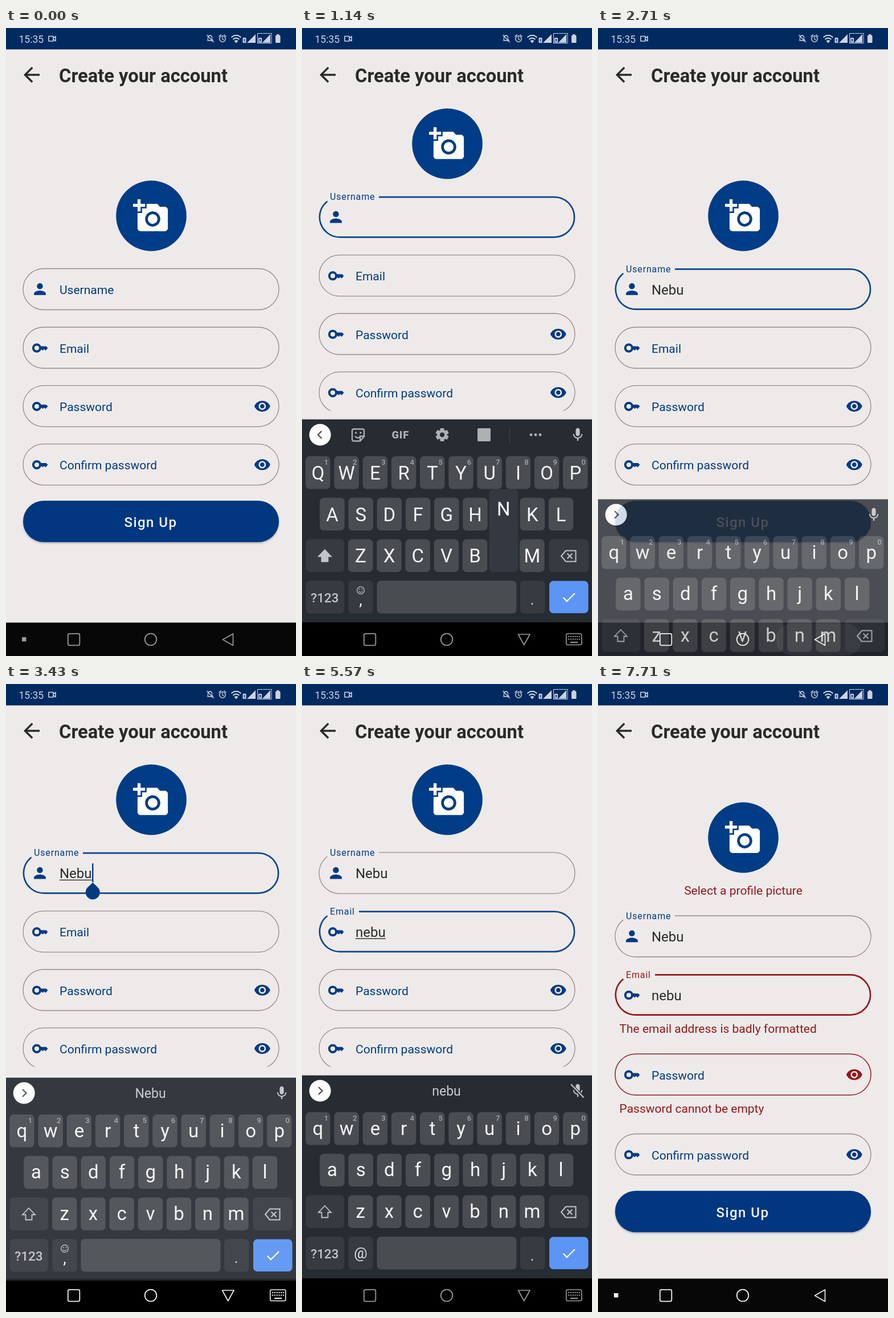
These frames come from a looping animation (509 px wide and 1100 px high, 8000 ms). An HTML page:

```html
<!DOCTYPE html>
<html lang="en">
<head>
<meta charset="utf-8">
<title>Create your account</title>
<style>
  html, body { margin: 0; width: 100%; height: 100%; overflow: hidden; background: #eeeaea; }
  svg { display: block; width: 100vw; height: 100vh; font-family: Roboto, sans-serif; }
</style>
</head>
<body>
<svg id="stage" viewBox="0 0 509 1100" preserveAspectRatio="none"></svg>
<script>
const stage = document.getElementById('stage');
const LOOP = 8000, FPS = 7;
const BLUE = '#003b82', RED = '#97161b', INK = '#2a2a2c', GREY = '#c3c5c8';
const NAME = 'Nebu';

const PATHS = {
  back: 'M20 11H7.83l5.59-5.59L12 4l-8 8 8 8 1.41-1.41L7.83 13H20z',
  camera: 'M3 4V1h2v3h3v2H5v3H3V6H0V4zm3 6V7h3V4h7l1.83 2H21c1.1 0 2 .9 2 2v12c0 1.1-.9 2-2 2H5c-1.1 0-2-.9-2-2V10zm7 9c2.76 0 5-2.24 5-5s-2.24-5-5-5-5 2.24-5 5 2.24 5 5 5zm-3.2-5c0 1.77 1.43 3.2 3.2 3.2s3.2-1.43 3.2-3.2-1.43-3.2-3.2-3.2-3.2 1.43-3.2 3.2z',
  person: 'M12 12c2.21 0 4-1.79 4-4s-1.79-4-4-4-4 1.79-4 4 1.79 4 4 4zm0 2c-2.67 0-8 1.34-8 4v2h16v-2c0-2.66-5.33-4-8-4z',
  eye: 'M12 4.5C7 4.5 2.73 7.61 1 12c1.73 4.39 6 7.5 11 7.5s9.27-3.11 11-7.5c-1.73-4.39-6-7.5-11-7.5zM12 17c-2.76 0-5-2.24-5-5s2.24-5 5-5 5 2.24 5 5-2.24 5-5 5zm0-8c-1.66 0-3 1.34-3 3s1.34 3 3 3 3-1.34 3-3-1.34-3-3-3z',
  mic: 'M12 14c1.66 0 3-1.34 3-3V5c0-1.66-1.34-3-3-3S9 3.34 9 5v6c0 1.66 1.34 3 3 3zm5.3-3c0 3-2.54 5.1-5.3 5.1S6.7 14 6.7 11H5c0 3.41 2.72 6.23 6 6.72V21h2v-3.28c3.28-.49 6-3.31 6-6.72z'
};

// Drawing helpers
const text = (x, y, size, fill, str, more = '') =>
  `<text x="${x}" y="${y}" font-size="${size}" fill="${fill}" ${more}>${str}</text>`;
const mid = (x, y, size, fill, str, more = '') => text(x, y, size, fill, str, 'text-anchor="middle" ' + more);
const rect = (x, y, w, h, fill, r = 0, more = '') =>
  `<rect x="${x}" y="${y}" width="${w}" height="${h}" rx="${r}" fill="${fill}" ${more}/>`;
const disc = (x, y, r, fill) => `<circle cx="${x}" cy="${y}" r="${r}" fill="${fill}"/>`;
const ring = (x, y, r, color, w) =>
  `<circle cx="${x}" cy="${y}" r="${r}" fill="none" stroke="${color}" stroke-width="${w}"/>`;
const line = (d, color, w, more = '') =>
  `<path d="${d}" fill="none" stroke="${color}" stroke-width="${w}" ${more}/>`;
const shape = (d, fill) => `<path d="${d}" fill="${fill}"/>`;
const icon = (name, x, y, s, fill) =>
  `<path transform="translate(${x - 12 * s} ${y - 12 * s}) scale(${s})" d="${PATHS[name]}" fill="${fill}" fill-rule="evenodd"/>`;
const group = (y, body, more = '') => `<g transform="translate(0 ${y})" ${more}>${body}</g>`;

const pen = document.createElement('canvas').getContext('2d');
const widthOf = str => { pen.font = '24px Roboto, sans-serif'; return pen.measureText(str).width; };

// Timeline, counted in steps of 1/7 s
const within = (k, ...spans) => spans.some(([a, b]) => k >= a && k <= b);
const typed = (k, word, times) => word.slice(0, times.filter(t => k >= t).length);
const SLIDE = {
  3: [60, .87], 4: [4, .93], 18: [40, .92], 19: [140, .82], 20: [300, .4],
  23: [60, .87], 24: [4, .93], 45: [40, .92], 46: [140, .82], 47: [300, .4]
};
const PRESS = { 8: 'N', 10: 'e', 12: 'b', 13: 'u', 32: 'n', 34: 'e', 36: 'b', 37: 'u' };

function stateAt(k) {
  const [offset, alpha] = SLIDE[k] || [0, 1];
  return {
    k, offset, alpha,
    email: k >= 27,
    user: typed(k, NAME, [9, 11, 13, 14]),
    mail: typed(k, NAME.toLowerCase(), [33, 35, 37, 38]),
    open: within(k, [3, 20], [23, 47]),
    closing: within(k, [18, 20], [45, 47]),
    lifted: within(k, [4, 17], [24, 44]),
    caret: within(k, [2, 5], [9, 13], [21, 31], [33, 38], [40, 41], [48, 51]),
    composing: within(k, [9, 17], [23, 26], [33, 44]),
    bright: within(k, [17, 33], [40, 56]),
    caps: k < 9,
    mailKeys: k >= 28,
    errors: k >= 52,
    press: PRESS[k],
    userFloat: Math.min(1, k / 2),
    mailFloat: Math.max(0, Math.min(1, (k - 26) / 2))
  };
}

function statusBar() {
  const c = '#cbd3e0';
  return rect(0, 0, 509, 37.5, '#002a60') +
    text(22.5, 25.5, 17.5, c, '15:35') +
    line('M75 14.5h8v8.5h-8zM83 17.5l4-2.5v7.5l-4-2.5', c, 1.6) +
    line('M354 22h9l-1.5-3v-3q-1-3-3.5-3t-3.5 3v3zM352.5 12l12 13', c, 1.3) +
    ring(380, 19, 5.2, c, 1.5) + line('M380 15.5v4l2.5 1.5M373.5 15l4-3.5M382.5 11.5l4 3.5', c, 1.4) +
    line('M395.5 16.5q8.5-7.5 17 0M398.5 20q5.5-4.8 11 0', c, 2) + shape('M400.5 22.5q3.5-2.5 7 0l-3.5 4z', c) +
    shape('M438 11v15h-15z', c) + rect(415.5, 17, 6, 9, c, 1) + rect(417.8, 19, 1.4, 5, '#002a60') +
    rect(441.5, 9.5, 24.5, 17, 'none', 0, `stroke="${c}" stroke-width="1"`) +
    shape('M464 11v14.5h-14z', c) + rect(443, 17, 6, 8.5, c, 1) + rect(445, 19, 2, 4.5, '#002a60') +
    rect(473, 13, 8.5, 13, c, 1) + rect(475, 11, 4.5, 2, c);
}

const keyGlyph = y => ring(54, y, 6.1, BLUE, 4) +
  shape(`M61 ${y - 3}h9.5l3 3-4 4.5-2.5-2.5-2.5 2.5-2-2H61z`, BLUE);

// One outlined field; "float" runs from placeholder (0) to raised label (1)
function field(y, label, o = {}) {
  const { float = 0, focus, error, value = '', underline, caret, eye, gap } = o;
  const color = error ? RED : focus ? '#0d478c' : '#918d8e';
  const stroke = focus ? 2.7 : error ? 1.5 : 1.3;
  // A thick stroke grows inwards
  const a = focus ? .9 : 0, b = 72 - a, r = 36 - a;
  const outline = `M${float === 1 ? gap : 66} ${a}H443A${r} ${r} 0 0 1 443 ${b}H66A${r} ${r} 0 0 1 ` +
    (float === 1 ? `44.5 ${36 - Math.sqrt(r * r - 21.5 ** 2)}` : `66 ${a}`);
  const end = 94 + widthOf(value);
  const mix = (from, to) => from + (to - from) * float;
  return group(y,
    line(outline, color, stroke) +
    (label === 'Username' ? icon('person', 59.5, 35.9, 1.3, BLUE) : keyGlyph(36.5)) +
    text(mix(94, 49), mix(44.5, 6), mix(21, 16), error && focus ? RED : BLUE, label, `letter-spacing="${.85 * float}"`) +
    (value && text(94, 45, 24, INK, value)) +
    (underline && value ? rect(94, 47.5, end - 94, 1.4, INK) : '') +
    (caret ? rect(end + .5, 19, 2.4, 33, BLUE) : '') +
    (eye ? icon('eye', 449.8, 36.3, 1.27, error ? RED : BLUE) : ''));
}

function form(s) {
  const e = s.errors;
  const onUser = s.k >= 1 && !s.email;
  const handleX = 94 + widthOf(s.user) + 1.7;
  const handle = within(s.k, [23, 26])
    ? shape(`M${handleX} 474l9 8.5a12.5 12.5 0 1 1-18 0z`, BLUE) : '';
  const glow = { 50: .06, 51: .12, 52: .1, 53: .05 }[s.k] || 0;
  const button = rect(30, 830.5, 449, 72, '#000', 36, 'opacity=".25" filter="url(#soft)"') +
    rect(30, 828, 449, 72.5, '#003780', 36) +
    rect(30, 828, 449, 72.5, '#fff', 36, `opacity="${glow}"`) +
    text(207.5, 874, 24, '#f4f4f6', 'Sign Up', 'font-weight="500" letter-spacing="1.45"');
  const body =
    group(e ? -60 : 0, disc(255, 329, 61.8, '#003d86') + icon('camera', 254.8, 329.3, 2.66, '#fff')) +
    field(e ? 406 : 421.5, 'Username', {
      float: s.userFloat, focus: onUser, value: s.user, gap: 135,
      underline: s.composing && onUser, caret: s.caret && onUser
    }) +
    field(e ? 508.5 : 524, 'Email', {
      float: s.mailFloat, focus: s.email, error: e, value: s.mail, gap: 100,
      underline: s.composing, caret: s.caret && s.email
    }) +
    field(e ? 648 : 626.3, 'Password', { eye: true, error: e }) +
    field(e ? 788 : 728.6, 'Confirm password', { eye: true }) +
    group(e ? 59.7 : 0, button) + handle +
    (e ? mid(255, 369, 21, RED, 'Select a profile picture') +
      text(37.5, 611, 21, RED, 'The email address is badly formatted') +
      text(37.5, 751, 21, RED, 'Password cannot be empty') : '');
  return `<g clip-path="url(#${s.lifted ? 'short' : 'tall'})">${group(s.lifted ? -126.3 : 0, body)}</g>`;
}

// Keyboard
const ROWS = ['qwertyuiop', 'asdfghjkl', 'zxcvbnm'];
const STEP = 50.2, KEY = '#494c51', DARK = '#363a41';
const keyX = (row, i) => [28, 53, 102.8][row] + STEP * i;
const keyY = row => 750 + 72.7 * row;
const cap = (x, y, w, fill) => rect(x, y, w, 57.5, fill, 7);

function toolbar(s) {
  const word = s.email ? s.mail : s.user;
  const y = 712.5, tint = '#aeb0b4';
  let out = disc(31.7, y, 19, '#fff') +
    line(word ? 'M29 706l6.5 6.5-6.5 6.5' : 'M34.5 706l-6.5 6.5 6.5 6.5', '#4a4d52', 2.2) +
    icon('mic', 484, y, 1.18, GREY);
  if (s.mailKeys) out += line('M472.5 702l22 23', '#272b32', 5) + line('M472 701l22.5 23.5', GREY, 2.2);
  if (word) return out + (s.composing && !s.closing ? mid(253.5, 721, 23, '#c9cbce', word) : '');
  const teeth = [0, 60, 120].map(a =>
    rect(242.5, 701, 7, 23, tint, 1, `transform="rotate(${a} 246 ${y})"`)).join('');
  return out +
    line('M91 702.5h15q3 0 3 3v10l-7 8H91q-3 0-3-3v-15q0-3 3-3zM93 715q5 6 10 0M109 715h-7v7', tint, 2.3) +
    disc(94.5, 709, 1.7, tint) + disc(103, 709, 1.7, tint) +
    mid(172.8, 719, 18.5, tint, 'GIF', 'font-weight="900" letter-spacing=".8"') +
    teeth + disc(246, y, 8.8, tint) + disc(246, y, 4, '#272b32') +
    rect(308, 701, 23, 23, tint, 2) + rect(364, 699, 1.2, 28, '#3d4148') +
    [402, 410, 418].map(x => disc(x, y, 2.4, tint)).join('');
}

function popup(ch) {
  const low = ch.toLowerCase();
  const row = ROWS.findIndex(r => r.includes(low));
  const x = keyX(row, ROWS[row].indexOf(low)), y = keyY(row);
  return rect(x - 25.5, y - 87.5, 51, 145, '#343840', 7) + mid(x, y - 41, 33, '#fff', ch);
}

function keyboard(s) {
  let out = rect(0, 685.5, 509, 356, '#272b32') + rect(0, 1041, 509, 60, '#000') + toolbar(s);
  ROWS.forEach((row, r) => [...row].forEach((ch, i) => {
    const x = keyX(r, i), y = keyY(r);
    out += cap(x - 21.8, y, 43.5, KEY) +
      mid(x, y + (s.caps ? 41 : 39.5), 33, '#f6f6f7', s.caps ? ch.toUpperCase() : ch);
    if (!r) out += mid(x + 14.5, y + 15, 13, '#a5a7aa', (i + 1) % 10, 'font-weight="500"');
  }));
  const y3 = keyY(2), y4 = keyY(3);
  out += cap(6.5, y3, 67.5, DARK) + cap(433.5, y3, 69.5, DARK) +
    `<path d="M40 914l11 11.5h-5.5v9h-11v-9H29z" fill="${s.caps ? GREY : 'none'}" stroke="${GREY}" stroke-width="1.8"/>` +
    line('M463 915.5h17.5v19H463l-8-9.5zM465.5 920.5l9 9M474.5 920.5l-9 9', GREY, 2) +
    cap(6.5, y4, 67.5, DARK) + mid(40, y4 + 38, 22.5, GREY, '?123', 'font-weight="500"') +
    cap(81.3, y4, 43.5, DARK);
  out += s.mailKeys ? mid(103, y4 + 38, 26, '#e0e1e3', '@')
    : ring(103, 985, 6.3, GREY, 1.3) + disc(100.8, 983, .9, GREY) + disc(105.2, 983, .9, GREY) +
      line('M99.8 986.5q3.2 4 6.4 0', GREY, 1.2) + mid(103, y4 + 43, 28, '#f0f0f1', ',');
  out += cap(131.5, y4, 245, KEY) + cap(383, y4, 43.5, DARK) + mid(404.3, y4 + 41.5, 26, '#e0e1e3', '.') +
    rect(434, y4 + .5, 68.5, 56.5, '#5c95f4', 7) + line('M458.5 997.5l6.5 6.5 14-14', '#fff', 2.3) +
    (s.press ? popup(s.press) : '');
  return group(s.offset, out, `opacity="${s.alpha}"`);
}

function navIcons(s) {
  const c = s.bright ? '#f0f0f0' : '#9b9b9b';
  const down = s.open && !s.closing;
  let out = within(s.k, [17, 19], [44, 46]) ? rect(312, 1043, 151, 56, '#fff', 28, 'opacity=".06"') : '';
  out += rect(108.8, 1060.8, 20.5, 20.5, 'none', 2.5, `stroke="${c}" stroke-width="1.8"`) +
    ring(254, 1071, 10.3, c, 1.8) +
    line(down ? 'M379.5 1062h20.5l-10.2 18.5z' : 'M398.5 1061v20.5l-18-10.2z', c, 1.7, 'stroke-linejoin="round"');
  if (!s.open) out += rect(28, 1067, 7.5, 7.5, c);
  if (down) {
    out += rect(463.8, 1061, 27, 19.5, 'none', 2, `stroke="${c}" stroke-width="1.6"`) +
      line('M467 1066h21M467 1070.5h21', c, 2.2, 'stroke-dasharray="2.2 1.6"') + rect(471, 1075, 13, 2, c);
  }
  return out;
}

const DEFS = `<defs>
  <clipPath id="short"><rect y="38" width="509" height="632.5"/></clipPath>
  <clipPath id="tall"><rect y="38" width="509" height="1004"/></clipPath>
  <filter id="soft" x="-5%" y="-20%" width="110%" height="150%"><feGaussianBlur stdDeviation="1.6"/></filter>
</defs>`;

function draw(k) {
  const s = stateAt(k);
  stage.innerHTML = DEFS + rect(0, 0, 509, 1100, '#eeeaea') + form(s) +
    icon('back', 45, 82, 1.75, INK) +
    text(93, 94.7, 32.7, INK, 'Create your account', 'font-weight="700"') +
    (s.lifted ? rect(0, 685.5, 509, 356, '#f0f1f4') : '') +
    rect(0, 1041.5, 509, 59, '#070707') +
    (s.open ? keyboard(s) : '') + navIcons(s) + statusBar();
}

const start = performance.now();
let shown = -1;
function tick() {
  const t = (performance.now() - start) % LOOP;
  const k = Math.floor(t * FPS / 1000 + .035);
  if (k !== shown) draw(shown = k);
  requestAnimationFrame(tick);
}
tick();
</script>
</body>
</html>
```
